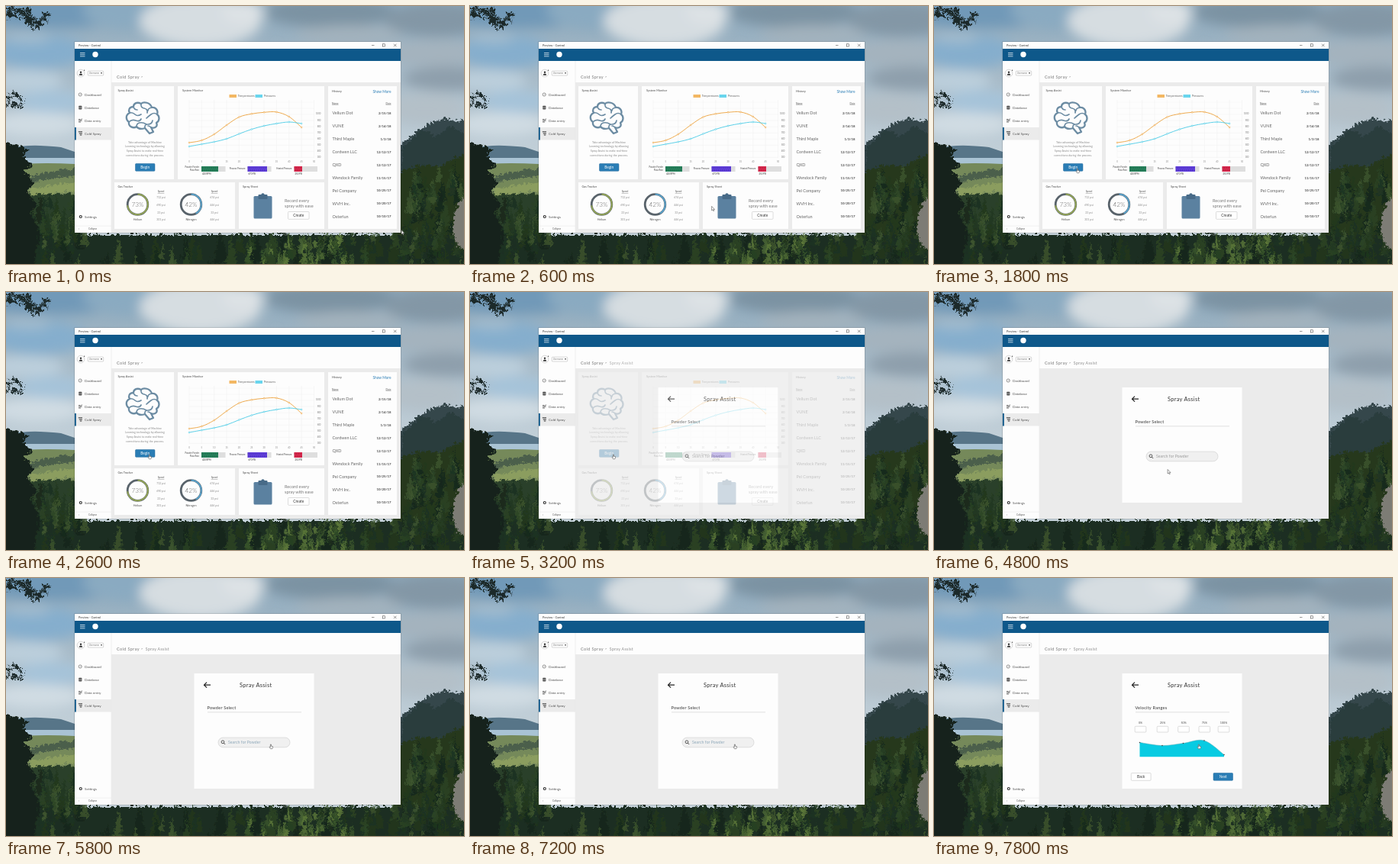
These frames come from a looping animation (600x338 px, 8000 ms). An HTML page:

```html
<!DOCTYPE html>
<html lang="en">
<head>
<meta charset="utf-8">
<title>Spray Assist</title>
<style>
  html, body { margin: 0; width: 100%; height: 100%; overflow: hidden; }
  svg { position: absolute; left: 0; top: 0; width: 600px; height: 338px; font-family: Lato, "Open Sans", sans-serif; }
</style>
</head>
<body>
<svg id="backdrop" viewBox="0 0 600 338"></svg>
<svg id="stage" viewBox="0 0 600 338"></svg>
<script>
const BLUE = '#2a7db5', SLATE = '#6c8ca3', INK = '#4c4c4c', PALE = '#8d8d8d';

let seed = 11;
const random = () => (seed = seed * 16807 % 2147483647) / 2147483647;
const range = (n, fn) => Array.from({ length: n }, (_, i) => fn(i)).join('');

const rect = (x, y, w, h, fill, extra = '') =>
  `<rect x="${x}" y="${y}" width="${w}" height="${h}" fill="${fill}" ${extra}/>`;
const circle = (x, y, r, fill, extra = '') => `<circle cx="${x}" cy="${y}" r="${r}" fill="${fill}" ${extra}/>`;
const shape = (d, fill, extra = '') => `<path d="${d}" fill="${fill}" ${extra}/>`;
const line = (d, stroke, width = 0.5, extra = '') =>
  `<path d="${d}" fill="none" stroke="${stroke}" stroke-width="${width}" ${extra}/>`;
// y is the middle of the line of text
const text = (x, y, size, str, fill = INK, extra = '') =>
  `<text x="${x}" y="${y + size * 0.35}" font-size="${size}" fill="${fill}" ${extra}>${str}</text>`;
const MID = 'text-anchor="middle"', END = 'text-anchor="end"', BOLD = 'font-weight="bold"';
const middle = (x, y, size, str, fill, extra = '') => text(x, y, size, str, fill, MID + ' ' + extra);

function smooth(pts) {
  let d = 'M' + pts[0];
  for (let i = 0; i < pts.length - 1; i++) {
    const p = pts[i], q = pts[i + 1], before = pts[i - 1] || p, after = pts[i + 2] || q;
    const a = [0, 1].map(k => p[k] + (q[k] - before[k]) / 6);
    const b = [0, 1].map(k => q[k] - (after[k] - p[k]) / 6);
    d += `C${a} ${b} ${q}`;
  }
  return d;
}

const puff = (x, y, rx, ry, fill, opacity = 1) =>
  `<ellipse cx="${x}" cy="${y}" rx="${rx}" ry="${ry}" fill="${fill}" opacity="${opacity}"/>`;

function trees(n, x0, x1, top, spread, height, colors) {
  return range(n, i => {
    const x = x0 + random() * (x1 - x0), h = height * (0.5 + random()), w = h * 0.2;
    const y = top + spread * (i / n) + random() * 8;
    return shape(`M${x} ${y}l${w} ${h}h${-2 * w}z`, colors[Math.floor(random() * colors.length)], 'opacity=".8"');
  });
}

const leaves = (n, x, y, w, h) =>
  range(n, () => puff(x + random() * w, y + random() * h, 1 + random() * 3, 0.8 + random() * 1.6, '#1d2a2b'));

function landscape() {
  const dark = ['#17271b', '#22371f', '#2c4326', '#1c3022', '#3d5530'];
  const sunny = ['#4c6834', '#3a552c', '#5d7839', '#2c4526'];
  return rect(0, 0, 600, 338, 'url(#sky)') +
    '<g filter="url(#blur)">' +
    puff(60, 5, 110, 24, '#7199b8') + puff(170, 5, 70, 26, '#8aaac1') + puff(45, 60, 60, 22, '#85aecd') +
    puff(30, 42, 28, 7, '#a9c0d0', 0.8) + puff(255, 20, 80, 34, '#d6dde1') + puff(310, 8, 28, 16, '#dde2e5') +
    puff(425, 8, 85, 20, '#7c93a3') + puff(450, 38, 70, 13, '#a3b2bd') + puff(565, 18, 70, 22, '#8397a6') +
    puff(560, 62, 60, 17, '#a4b3be') + puff(580, 95, 60, 16, '#8e9fac') + puff(550, 135, 50, 20, '#b4c0c8') +
    puff(25, 98, 50, 14, '#bccfdc') + puff(60, 125, 45, 15, '#a5c3d9') + puff(40, 155, 60, 16, '#d0dce3') +
    '</g>' +
    shape('M0 187Q25 182 45 183T72 185L90 191V203H0z', '#577588') +
    rect(0, 199, 90, 9, '#a9c3d4') +
    shape('M0 209Q40 204 90 207V260H0z', '#75895a') +
    '<g filter="url(#rough)">' +
    shape('M30 222Q60 211 92 212V221Q55 222 30 230z', '#4c5f4c') +
    shape('M30 237L92 229V240L30 246z', '#8b9d5f') +
    shape('M-9 250Q60 240 95 247V345H-9z', '#2b4029') +
    shape('M505 185L518 178L535 163L553 152L572 145L588 149L606 145V260H505z', '#35464b') +
    shape('M517 184L545 160L560 170L580 156L606 168V230H517z', '#263a3a', 'opacity=".8"') +
    shape('M505 222Q540 200 563 209L606 188V345H505z', '#26391f') +
    shape('M-9 298H609V345H-9z', '#1e2f21') +
    trees(45, 20, 95, 237, 65, 28, dark) +
    trees(110, 0, 600, 280, 42, 32, dark) +
    trees(45, 310, 475, 288, 36, 20, sunny) +
    trees(70, 520, 600, 200, 100, 26, dark) +
    shape('M586 270L596 248L606 250V317L590 314L583 292z', '#7d7c74') +
    shape('M-9 174L10 180L28 186L20 194L33 207L22 214L35 231L25 240L38 259L30 268L43 296L32 345H-9z', '#17241c') +
    leaves(45, -2, -2, 32, 18) + leaves(28, 22, 8, 34, 14) + leaves(9, 32, 20, 12, 12) + leaves(24, -2, 112, 22, 20) +
    '</g>';
}

function windowFrame() {
  const icons = [116, 133, 150, 167, 276];
  const labels = ['Dashboard', 'Database', 'Data entry', 'Cold Spray', 'Settings'];
  return rect(89.4, 46.4, 428.2, 251.2, '#000', 'opacity=".2"') +
    rect(90, 47, 427, 250, '#fdfdfd') +
    text(95, 51.5, 3.8, 'Preview - Control', '#333') +
    line('M479 51.5h3.5M508 49.7l3.5 3.5m0-3.5l-3.5 3.5', '#333') +
    rect(493.5, 49.8, 3.2, 3.2, 'none', 'stroke="#333" stroke-width=".5"') +
    rect(90, 56, 427, 16, '#0e588a') +
    line('M97 61.5h6.5M97 63.7h6.5M97 65.9h6.5', '#fff', 0.7) +
    circle(117, 63.5, 3.7, '#fff') +
    circle(98, 88, 4.8, '#fff', 'stroke="#999" stroke-width=".4"') +
    circle(98, 86.7, 1.2, '#333') + shape('M95.8 90.7q0-2.2 2.2-2.2t2.2 2.2z', '#333') +
    circle(102.6, 84.3, 0.7, '#555') +
    rect(107.3, 85.2, 20.4, 5.8, '#fff', 'rx="1" stroke="#999" stroke-width=".4"') +
    text(108.8, 88, 3, 'Username', '#777') + shape('M123.8 87.2h2.4l-1.2 1.8z', '#333') +
    rect(90, 159, 48, 16.5, '#ebebeb') + rect(90, 159, 1.8, 16.5, '#0e588a') +
    labels.map((s, i) => text(103, icons[i], 4.6, s, '#555')).join('') +
    circle(97.2, 116, 2.1, 'none', 'stroke="#555" stroke-width=".6"') + line('M97.2 116.5l1-1.2', '#444') +
    rect(95.2, 130.7, 4.2, 4.8, '#444', 'rx=".8"') + line('M95.2 132.5h4.2M95.2 134h4.2', '#fff', 0.4) +
    line('M95 148.5h2.5M95 150.2h4.5M95 152h3M97.5 149.7l2.5-2', '#444', 0.8) +
    line('M94.8 164.8h5.2M95.8 167h4M96.8 169h2.5', '#333', 1) +
    circle(97.8, 276, 1.5, 'none', 'stroke="#333" stroke-width="1.2"') +
    line('M90 288.2h48', '#e2e2e2') + text(95, 292, 4, '‹') + text(108, 292.3, 3, 'Collapse', '#555') +
    line('M138 72V297', '#e2e2e2') + rect(138, 100, 379, 197, '#ebebeb') +
    text(145, 92.8, 5.5, 'Cold Spray', '#777', 'letter-spacing=".4"') +
    text(176.7, 92.8, 4.6, '&gt;', '#777') +
    text(182.8, 92.8, 5.2, 'Spray Assist', '#888', 'id="crumb" letter-spacing=".35"');
}

const button = (x, y, w, label, filled) =>
  rect(x, y, w, 9.8, filled ? BLUE : '#fff', `rx="1" stroke="${filled ? '#23699a' : '#bbb'}" stroke-width=".5"`) +
  middle(x + w / 2, y + 4.9, 4.8, label, filled ? '#fff' : '#333');

const brain =
  line('M177 128C171 125 167 128 167 132C161 132 160 137 162 140C156 143 157 149 161 152C160 158 167 161 171 158' +
    'C174 162 179 161 182 160L188 167L193 165L190 159C196 161 199 157 197 153C202 150 201 144 198 142' +
    'C200 136 195 132 191 133C189 126 180 125 177 128z', SLATE, 2.3, 'stroke-linejoin="round"') +
  line('M167 132q1 4 5 4M177 128q-1 5 4 6t4 6M162 140q4-1 7 2t8 0M191 133q-5 1-5 4M198 142q-4-3-8 0t-6 5' +
    'M161 152q4-4 9-2t7-2M171 158q0-4 4-5t9 2M182 160q-1-5 4-5t6-5M190 159q-2-2-4-2', SLATE, 1.7, 'stroke-linecap="round"');

function monitor() {
  const ticks = i => 240 + i * 16.35;
  const curve = (ys, color) => {
    const pts = ys.map((y, i) => [ticks(i), y]);
    return line(smooth(pts), color, 0.9) + pts.map(p => circle(...p, 0.9, '#fff', `stroke="${color}" stroke-width=".6"`)).join('');
  };
  const legend = (x, color, label) =>
    rect(x, 116, 9.5, 4, color, 'opacity=".75"') + text(x + 11.2, 118, 3.7, label, '#666');
  const gauge = (x, w, full, color, label, value) =>
    rect(x, 210, full, 7, '#dedede') + rect(x, 210, w, 7, color) +
    line(`M${x} 212h${w}M${x + .8} 215h${w - 1}`, '#222', 1, 'stroke-dasharray="1 1.6" opacity=".4"') +
    label.map((s, i) => text(x - 3, 213.5 + (i - (label.length - 1) / 2) * 4, 2.8, s, '#444', END)).join('') +
    text(x + 1, 219.6, 2.8, value, '#333');
  return text(231, 111, 3.9, 'System Monitor') +
    legend(292.5, '#f0a030', 'Temperatures') + legend(326.5, '#38c8e8', 'Pressures') +
    range(11, i => line(`M${ticks(i)} 123V199`, '#eee', 0.4) + middle(ticks(i), 204, 2.8, i * 5, '#888')) +
    range(10, i => line(`M240 ${126 + i * 8.05}H404`, '#eee', 0.4)) +
    range(8, i => text(412.5, 141.5 + i * 8.05, 2.8, 1000 - i * 100, '#777', END)) +
    curve([179, 176, 168, 156, 145.5, 141.3, 139.3, 138.9, 145, 159], '#eda23d') +
    curve([184, 181, 178, 174, 167.5, 161.5, 157, 154, 152, 154], '#4acbe6') +
    gauge(256, 22, 31.5, '#25815b', ['Powder Feeder', 'Flow Rate'], '420 RPM') +
    gauge(316.5, 25.5, 31, '#5f3ddd', ['Process Pressure'], '670 PSI') +
    gauge(377.5, 10.5, 30.5, '#d9264b', ['Heated Pressure'], '250 PSI');
}

function gas(x, part, name, color, values) {
  const len = 2 * Math.PI * 13.3;
  return circle(x, 260, 13.3, 'none', 'stroke="#59636b" stroke-width="2.8"') +
    circle(x, 260, 13.3, 'none', `stroke="${color}" stroke-width="1.8" stroke-dasharray="${len * part / 100} ${len}" transform="rotate(-90 ${x} 260)"`) +
    middle(x, 260, 8.2, part + '%', '#666', 'font-weight="300"') + middle(x, 279.8, 3.7, name) +
    middle(x + 30.5, 243.3, 3.2, 'Speed', '#555', 'text-decoration="underline"') +
    values.map((v, i) => middle(x + 30.5, 251.2 + i * 9.6, 3.6, v + ' psi', PALE)).join('');
}

function history() {
  const rows = [['Vellum Dot', '2/15/18'], ['VUNE', '2/14/18'], ['Third Maple', '1/3/18'], ['Cordwen LLC', '12/12/17'],
    ['QXD', '12/12/17'], ['Wendock Family', '11/15/17'], ['Pel Company', '10/25/17'], ['WVH Inc.', '10/20/17'],
    ['Osterlun', '10/10/17'], ['Dunmere', '10/8/17']];
  return text(427, 112, 4, 'History') + text(504.5, 112, 4.8, 'Show More', BLUE, END) +
    text(427, 127.5, 3.3, 'Name', '#555', 'text-decoration="underline"') +
    text(504.5, 127.5, 3.3, 'Date', '#555', END + ' text-decoration="underline"') +
    '<g clip-path="url(#rows)">' + rows.map(([name, date], i) =>
      text(427.5, 140.5 + i * 16.9, 5.5, name, '#666') +
      text(504.5, 140.5 + i * 16.9, 4.3, date, '#444', END + ' ' + BOLD)).join('') + '</g>';
}

function dashboard() {
  const intro = ['Take advantage of Machine', 'Learning technology by allowing', 'Spray Assist to make real-time', 'corrections during the process.'];
  return rect(138.3, 100, 378.7, 197, '#ebebeb') +
    [[142, 105, 78, 122], [225, 105, 192, 122], [422, 105, 90, 187], [142, 231, 158, 61], [305, 231, 112, 61]]
      .map(b => rect(...b, '#fdfdfd')).join('') +
    text(146.5, 111, 3.9, 'Spray Assist') + brain +
    intro.map((s, i) => middle(182, 178.5 + i * 5.7, 3.7, s, PALE)).join('') +
    button(169.5, 206.5, 25.5, 'Begin', true) + monitor() + history() +
    text(146.5, 237, 3.9, 'Gas Tracker') +
    gas(172.5, 73, 'Helium', '#97a955', [712, 690, 23, 301]) + gas(242.5, 42, 'Nitrogen', '#5aa5cf', [674, 446, 33, 446]) +
    text(310, 237, 3.9, 'Spray Sheet') +
    rect(324.5, 249, 24, 29.5, '#5b81a0', 'rx="1.5"') + rect(330.5, 247, 12, 6, '#486b88', 'rx="1"') +
    circle(336.5, 247.5, 2.2, '#486b88') +
    text(365, 255, 5.6, 'Record every', '#777') + text(365, 261.7, 5.6, 'spray with ease', '#777') +
    button(369.5, 269.5, 27.5, 'Create');
}

const heading = label => text(263.5, 170, 5.6, label, '#333', 'letter-spacing=".22"') + line('M264 175.8H387', '#c4c4c4', 0.5);

const search = heading('Powder Select') +
  rect(278, 209, 94, 12.8, '#f0f0f0', 'rx="6.4" stroke="#c4c4c4" stroke-width=".5"') +
  circle(284, 214.8, 1.9, 'none', 'stroke="#333" stroke-width=".8"') + line('M285.4 216.2l1.8 1.8', '#333', 0.9) +
  text(291, 215.3, 5.1, 'Search for Powder', '#999', 'id="hint" letter-spacing=".08"');

function velocity() {
  const xs = [270.5, 299.5, 327, 354.3, 379.5];
  const pts = [[269.5, 215.5], [299, 219.5], [326.5, 216.5], [354, 213], [380, 231.5]];
  return heading('Velocity Ranges') +
    xs.map((x, i) => middle(x, 190, 3.7, i * 25 + '%') +
      rect(x - 7.3, 194.3, 14.6, 7.7, '#fff', 'rx="1" stroke="#bbb" stroke-width=".5"')).join('') +
    shape(smooth(pts) + 'V234.3H269.5z', '#08cbe2') + line(smooth(pts), '#59a6b0') +
    pts.map(p => circle(...p, 0.8, '#444')).join('') +
    button(258.3, 255.5, 25.8, 'Back') + button(366, 255.5, 25.5, 'Next', true);
}

const assist = rect(246.5, 125, 157, 151, '#fdfdfd') +
  line('M268 140.2H259.5M263 136.7l-3.5 3.5l3.5 3.5', '#222', 1.2) +
  middle(327.2, 140.2, 7.4, 'Spray Assist', '#333', 'letter-spacing=".32"') +
  `<g id="search">${search}</g><g id="velocity">${velocity()}</g>`;

const pointers =
  `<g id="pointer" stroke="#555" stroke-width=".6" stroke-linejoin="round">` +
  shape('M-1-2.5V3L.3 2L1.2 3.8L2.1 3.4L1.2 1.6H2.9z', '#fff', 'id="arrow"') +
  shape('M-.6-2q.6-.5 1 0V.2L2.5.7Q2.9 2.6 1.9 3.7H-.6L-2 1.4q.4-.7 1.4.2z', '#fff', 'id="hand"') + '</g>';

const el = id => document.getElementById(id);

el('backdrop').innerHTML = `<defs>
  <linearGradient id="sky" x2="0" y2="1"><stop stop-color="#8ea9bc"/><stop offset=".3" stop-color="#a9bcc9"/><stop offset=".6" stop-color="#c5d2da"/></linearGradient>
  <filter id="blur" x="-20%" y="-20%" width="140%" height="140%"><feGaussianBlur stdDeviation="8"/></filter>
  <filter id="rough"><feTurbulence baseFrequency=".16" numOctaves="3" seed="4"/>
    <feDisplacementMap in="SourceGraphic" scale="9" xChannelSelector="R" yChannelSelector="G"/></filter>
  <clipPath id="rows"><rect x="422" y="130" width="90" height="159"/></clipPath></defs>` + landscape();
el('stage').innerHTML = windowFrame() + assist + `<g id="dashboard">${dashboard()}</g>` + pointers;

const fade = (t, from, to) => Math.min(1, Math.max(0, (t - from) / (to - from)));
const show = (id, opacity) => el(id).setAttribute('opacity', opacity);

// time, x, y of the pointer
const route = [[100, 519, 296], [600, 318, 265], [1300, 188, 215], [4200, 188, 215], [4800, 307, 235], [5500, 347, 220], [8000, 347, 220]];

function pointerAt(t) {
  const i = route.findIndex(p => p[0] > t), b = route[i], a = route[i - 1];
  if (!a) return b.slice(1);
  const k = fade(t, a[0], b[0]), leaving = i === 1 || i === 4;
  const e = leaving ? k ** 1.5 : 1 - (1 - k) ** 2;
  return [1, 2].map(n => a[n] + (b[n] - a[n]) * e);
}

function draw(now) {
  const t = now % 8000, open = fade(t, 2900, 3320), next = fade(t, 7300, 7650);
  show('dashboard', 1 - open);
  show('crumb', open);
  show('search', 1 - next);
  show('velocity', next);
  const [x, y] = pointerAt(t);
  el('pointer').setAttribute('transform', `translate(${x} ${y})`);
  const onButton = t > 1200 && t < 4280, onField = t > 5000;
  show('hand', +(onButton || onField));
  show('arrow', +!(onButton || onField));
  el('hint').setAttribute('fill', onField ? '#8ba6b8' : '#999');
  requestAnimationFrame(draw);
}
requestAnimationFrame(draw);
</script>
</body>
</html>
```
